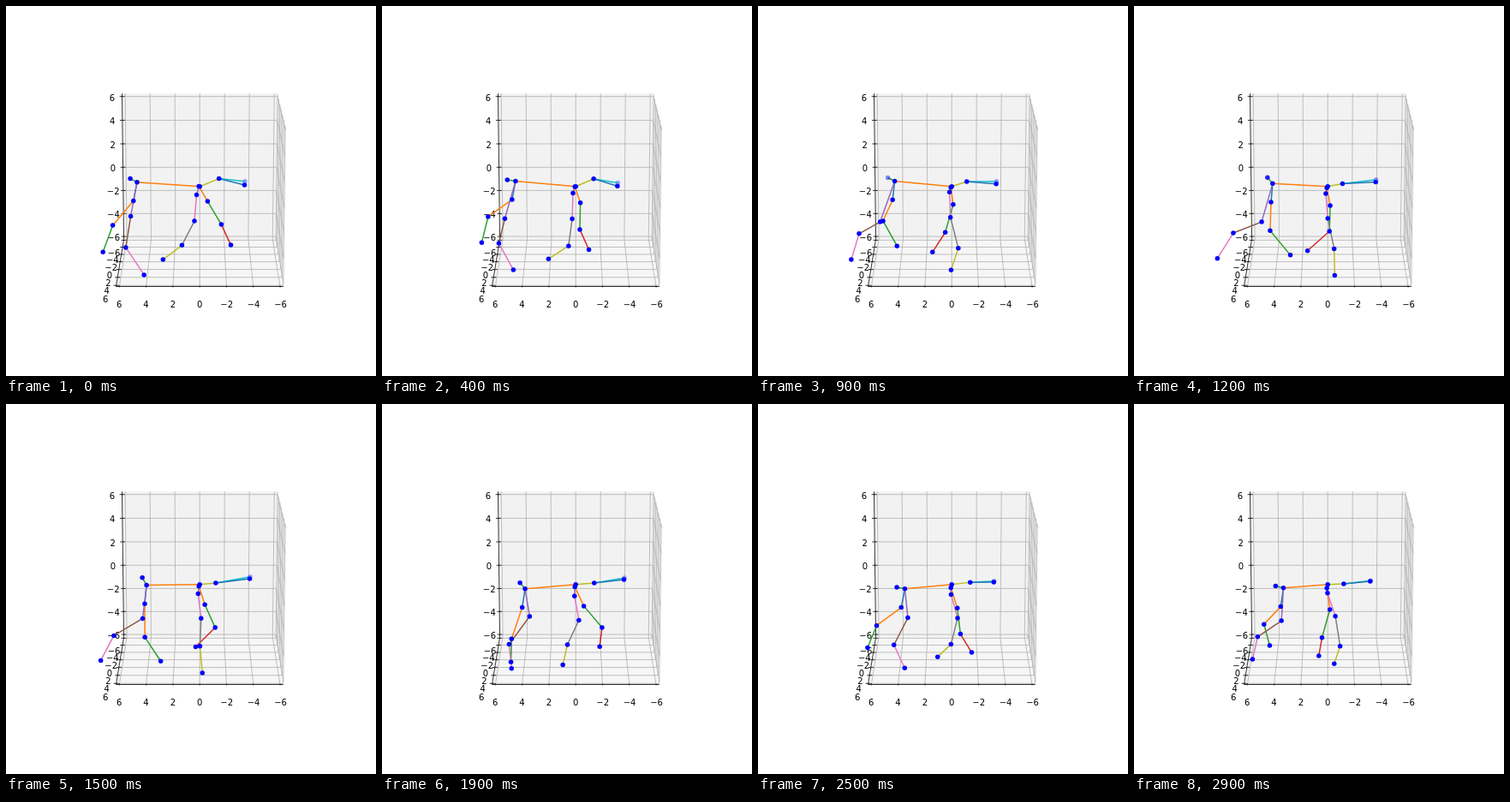
An HTML page with a canvas that plays this animation: 432x432 px, repeating every 3 s.

```html
<!DOCTYPE html>
<html lang="en">
<head>
<meta charset="utf-8">
<title>Walking skeleton in a 3D plot</title>
<style>
html, body { margin: 0; width: 100%; height: 100%; overflow: hidden; background: #fff; }
canvas { display: block; }
</style>
</head>
<body>
<canvas id="stage" width="432" height="432"></canvas>
<script>
const ctx = document.getElementById('stage').getContext('2d');
const STEP = 100, STEPS = 30, STRIDE = 22, LIMIT = 6.25;
const TICKS = [-6, -4, -2, 0, 2, 4, 6];

const BLUE = '#1f77b4', ORANGE = '#ff7f0e', GREEN = '#2ca02c', RED = '#d62728',
  PURPLE = '#9467bd', BROWN = '#8c564b', PINK = '#e377c2', GRAY = '#7f7f7f',
  OLIVE = '#bcbd22', CYAN = '#17becf';

// One stride of swing plus a steady drift as the body turns.
function gait(t, { rest, cos = 0, sin = 0, drift = 0 }) {
  const phase = 2 * Math.PI * t / STRIDE;
  return rest + cos * Math.cos(phase) + sin * Math.sin(phase) + drift * t;
}

// A joint swings around the joint it hangs from.
const joint = (parent, x, y) => t => {
  const [px, py] = parent(t);
  return [px + gait(t, x), py + gait(t, y)];
};

const root = () => [226.2, 210.7];
const chest = joint(root, { rest: -73.2, drift: 0.74 },
  { rest: -7.5, cos: 2.5, sin: -2, drift: 0.5 });
const nose = joint(chest, { rest: -7.3, cos: -0.6, sin: -2.3 }, { rest: -5.1, cos: 1, sin: 3.5 });
const pelvis = joint(root, { rest: -1 }, { rest: -0.3, drift: 0.16 });
const neck = joint(root, { rest: 19.8, cos: 2.7 }, { rest: -8.2, cos: -0.9, sin: -1.7, drift: 0.3 });
const nearTip = joint(neck, { rest: 33.7, cos: -3.9, sin: -4.8 },
  { rest: 5.6, cos: 1.7, sin: 4.1, drift: -0.4 });
const farTip = joint(nearTip, { rest: 0.4 }, { rest: -4.2, drift: 0.12 });

const shoulderA = joint(chest, { rest: -3.1, cos: -1.1, sin: -0.6 }, { rest: 21.7 });
const kneeA = joint(chest, { rest: -17, cos: -11.3, sin: -11.4 }, { rest: 51.2, cos: -0.9, sin: -10.2 });
const footA = joint(kneeA, { rest: 5.5, cos: -17, sin: -6.5 }, { rest: 31.2, drift: -0.22 });

const elbowB = joint(chest, { rest: -14.7, cos: 7.3, sin: -3.8, drift: 0.65 },
  { rest: 45.2, cos: -5.3, sin: 2.7, drift: -0.4 });
const kneeB = joint(elbowB, { rest: -15.6, cos: 9.9, sin: 7.1, drift: -0.5 },
  { rest: 24.3, cos: 12, sin: -0.7 });
const footB = joint(kneeB, { rest: 4.2, cos: 17.1, sin: 7.8, drift: -0.35 },
  { rest: 32, drift: -0.2 });

const hipC = joint(pelvis, { rest: 6.7, cos: 3.5, sin: -1.9 }, { rest: 17.7, drift: 0.25 });
const kneeC = joint(hipC, { rest: 5.7, cos: 10.3, sin: -11.7 }, { rest: 29, cos: -2, sin: 3.3 });
const footC = joint(kneeC, { rest: -6.1, cos: 17.2, sin: 10.5 }, { rest: 24, drift: -0.1 });

const hipD = joint(pelvis, { rest: -2.7, drift: 0.12 }, { rest: 8.1, cos: 2.1, sin: -1.7 });
const thighD = joint(hipD, { rest: -2.5, drift: 0.4 }, { rest: 30.5, drift: -0.12 });
const kneeD = joint(thighD, { rest: -2.8, cos: -11.8, sin: 3.8 }, { rest: 32.1, cos: -3.9, sin: 1.3 });
const footD = joint(kneeD, { rest: -14.1, cos: -7.9, sin: -8.4, drift: 0.4 },
  { rest: 23.2, cos: -6.4, sin: -5.9 });

const chains = [
  [[neck, farTip], [CYAN]],
  [[neck, nearTip], [BLUE]],
  [[root, neck], [OLIVE]],
  [[chest, nose], [GREEN]],
  [[root, chest], [ORANGE]],
  [[root, pelvis], [RED]],
  [[chest, shoulderA, kneeA, footA], [BLUE, ORANGE, GREEN]],
  [[chest, elbowB, kneeB, footB], [PURPLE, BROWN, PINK]],
  [[pelvis, hipC, kneeC, footC], [ORANGE, GREEN, RED]],
  [[pelvis, hipD, thighD, kneeD, footD], [PURPLE, PINK, GRAY, OLIVE]]
];
const solidJoints = new Set(chains.flatMap(([joints]) => joints));
solidJoints.delete(farTip);
solidJoints.delete(nose);

// Perspective view of the plot box.
function project(x, y, z) {
  const depth = (y + LIMIT) / 12.5, up = (z + LIMIT) / 12.5;
  const w = 0.01128 - 0.001045 * depth - 0.000255 * up;
  return [226.2 - x / LIMIT / w, (3.0727 + 0.2793 * depth - 1.9459 * up) / w];
}

function trace(points) {
  ctx.beginPath();
  points.forEach(p => ctx.lineTo(...p));
}

function stroke(color, width, ...points) {
  ctx.strokeStyle = color;
  ctx.lineWidth = width;
  trace(points);
  ctx.stroke();
}

function pane(color, ...corners) {
  ctx.fillStyle = color;
  trace(corners.map(c => project(...c)));
  ctx.fill();
}

function label(n, x, y) {
  ctx.fillText(String(n).replace('-', '\u2212'), x, y + 3.6);
}

function drawAxes() {
  const L = LIMIT;
  const line = (color, ...pts) => stroke(color, 0.8, ...pts.map(p => project(...p)));
  pane('#f9f9f9', [-L, -L, -L], [-L, L, -L], [-L, L, L], [-L, -L, L]);
  pane('#f2f2f2', [L, -L, -L], [-L, -L, -L], [-L, -L, L], [L, -L, L]);
  pane('#f6f6f6', [L, -L, -L], [-L, -L, -L], [-L, L, -L], [L, L, -L]);

  for (const n of TICKS) {
    line('#b0b0b0', [n, L, -L], [n, -L, -L], [n, -L, L]);
    line('#b0b0b0', [L, n, -L], [-L, n, -L], [-L, n, L]);
    line('#b0b0b0', [L, -L, n], [-L, -L, n], [-L, L, n]);
  }
  line('#000', [L, -L, L], [L, -L, -L], [L, L, -L], [-L, L, -L]);

  ctx.fillStyle = '#000';
  ctx.font = '10px "DejaVu Sans", sans-serif';
  ctx.textAlign = 'center';
  const outer = L + 0.2, inner = L - 0.2;
  TICKS.forEach((n, i) => {
    line('#000', [n, outer, -L], [n, inner, -L]);
    line('#000', [outer, n, -L], [inner, n, -L]);
    line('#000', [outer, -L, n], [inner, -L, n]);
    label(n, 226.3 - 15.7 * n, 348.8);
    label(n, 126 - 1.65 * i, 288.6 + 8.1 * i + 0.15 * i * i);
    label(n, 125.7 - 0.28 * i, project(L, -L, n)[1] + 1.3);
  });
}

function dot([x, y], alpha = 1) {
  ctx.globalAlpha = alpha;
  ctx.fillStyle = '#00f';
  ctx.beginPath();
  ctx.arc(x, y, 2.75, 0, Math.PI * 2);
  ctx.fill();
  ctx.globalAlpha = 1;
}

function draw(t) {
  ctx.fillStyle = '#fff';
  ctx.fillRect(0, 0, 432, 432);
  drawAxes();
  dot(farTip(t), 0.35);
  for (const [joints, colors] of chains) {
    colors.forEach((color, i) => stroke(color, 1.5, joints[i](t), joints[i + 1](t)));
  }
  // The nose fades while it swings to the far side.
  dot(nose(t), 1 - 0.55 * Math.max(0, 1 - Math.abs(t - 9) / 4));
  solidJoints.forEach(j => dot(j(t)));
}

function tick() {
  draw(Math.floor(performance.now() / STEP) % STEPS);
  requestAnimationFrame(tick);
}
tick();
</script>
</body>
</html>
```
